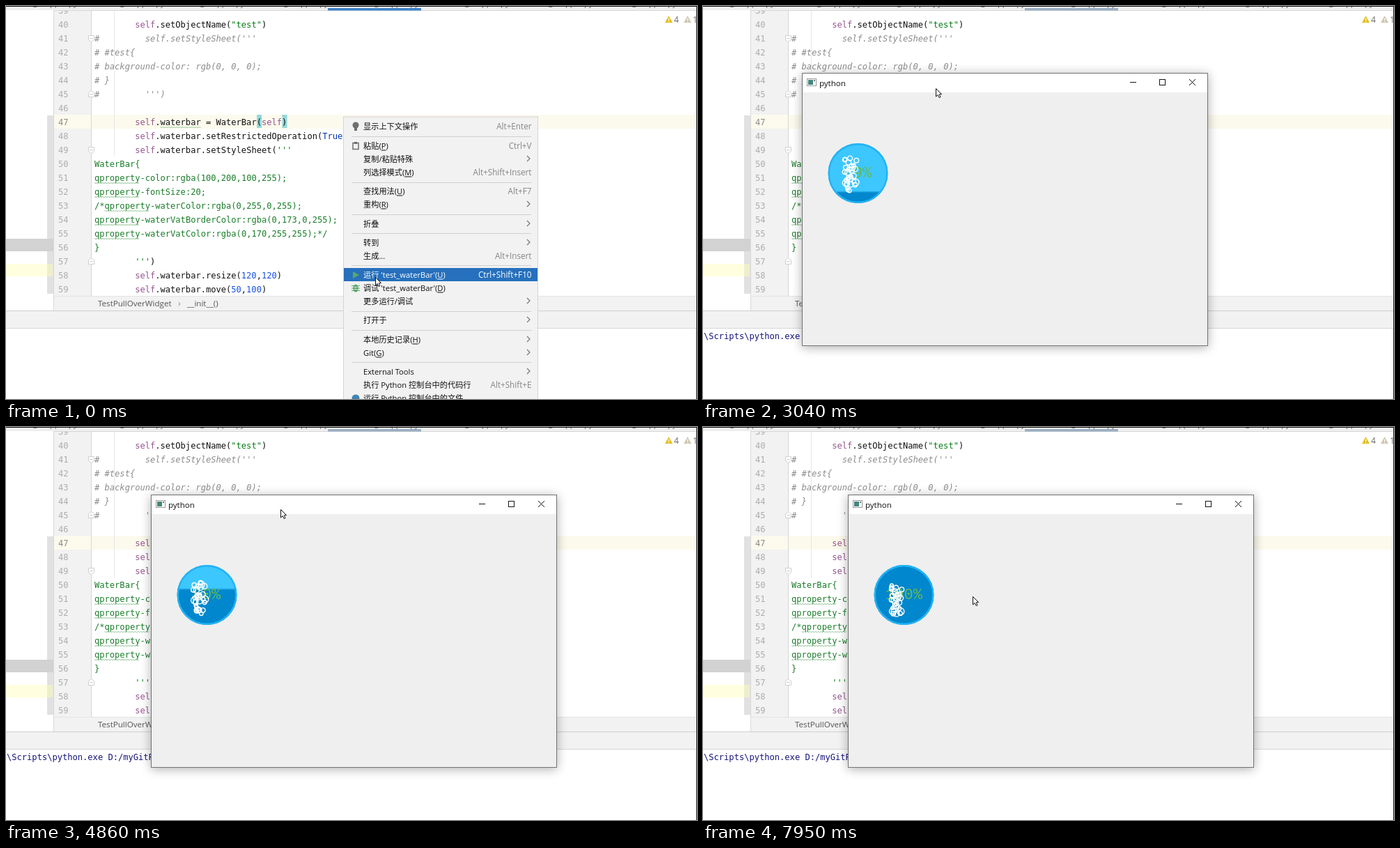
Animation of 992 by 564 pixels, one loop 7990 ms. Source, as an HTML page with a canvas:

```html
<!DOCTYPE html>
<html>
<head>
<meta charset="utf-8">
<style>
  html, body { margin: 0; width: 100%; height: 100%; overflow: hidden; background: #fff; }
  canvas { display: block; }
</style>
</head>
<body>
<canvas id="stage" width="992" height="564"></canvas>
<script>
const ctx = document.getElementById('stage').getContext('2d');
const LOOP = 7990, CHAR = 7.27, CODE_X = 127;
const MONO = '12.08px "DejaVu Sans Mono", monospace';
const ui = size => `${size}px "Open Sans", "Noto Sans CJK SC", "Noto Sans CJK", sans-serif`;

function rect(x, y, w, h, color) {
  ctx.fillStyle = color;
  ctx.fillRect(x, y, w, h);
}
function text(str, x, y, color, font, align = 'left') {
  ctx.font = font;
  ctx.fillStyle = color;
  ctx.textAlign = align;
  ctx.fillText(str, x, y);
}
function path(points, { fill, stroke, width = 1, close = false }) {
  ctx.beginPath();
  points.forEach(([x, y]) => ctx.lineTo(x, y));
  if (close) ctx.closePath();
  if (fill) { ctx.fillStyle = fill; ctx.fill(); }
  if (stroke) { ctx.strokeStyle = stroke; ctx.lineWidth = width; ctx.stroke(); }
}
function circle(x, y, r, { fill, stroke, width = 1 }) {
  ctx.beginPath();
  ctx.arc(x, y, r, 0, Math.PI * 2);
  if (fill) { ctx.fillStyle = fill; ctx.fill(); }
  if (stroke) { ctx.strokeStyle = stroke; ctx.lineWidth = width; ctx.stroke(); }
}
const clamp = v => Math.min(1, Math.max(0, v));
const random = n => { const s = Math.sin(n * 127.1 + 11.7) * 43758.5453; return s - Math.floor(s); };

// Keys are [time, x, y]; eased between neighbours.
function along(keys, t) {
  let i = 0;
  while (i < keys.length - 2 && t > keys[i + 1][0]) i++;
  const [a, b] = [keys[i], keys[i + 1]];
  const p = clamp((t - a[0]) / (b[0] - a[0]));
  const e = p * p * (3 - 2 * p);
  return [a[1] + (b[1] - a[1]) * e, a[2] + (b[2] - a[2]) * e];
}

// ---------- editor ----------
const source = {
  40: '        self.setObjectName("test")',
  41: "#         self.setStyleSheet('''",
  42: '# #test{',
  43: '# background-color: rgb(0, 0, 0);',
  44: '# }',
  45: "#         ''')",
  47: '        self.waterbar = WaterBar(self)',
  48: '        self.waterbar.setRestrictedOperation(True)',
  49: "        self.waterbar.setStyleSheet('''",
  50: 'WaterBar{',
  51: 'qproperty-color:rgba(100,200,100,255);',
  52: 'qproperty-fontSize:20;',
  53: '/*qproperty-waterColor:rgba(0,255,0,255);',
  54: 'qproperty-waterVatBorderColor:rgba(0,173,0,255);',
  55: 'qproperty-waterVatColor:rgba(0,170,255,255);*/',
  56: '}',
  57: "        ''')",
  58: '        self.waterbar.resize(120,120)',
  59: '        self.waterbar.move(50,100)'
};
const lineY = n => 30.6 + (n - 40) * 20;

function tokenColor(token) {
  if (token === 'self') return '#94558d';
  if (token === 'True') return '#0033b3';
  if (/^\d/.test(token)) return '#1750eb';
  return /^["']/.test(token) ? '#067d17' : '#111';
}
function drawLine(n) {
  const line = source[n], y = lineY(n);
  if (line[0] === '#') return text(line, CODE_X, y, '#8c8c8c', 'italic ' + MONO);
  if (n >= 50 && n <= 56) text(line, CODE_X, y, '#1a7d2a', MONO);
  else for (const m of line.matchAll(/self|True|\d+|"test"|'''|[^\s]+?(?=self|True|\d|"|'''|\s|$)/g))
    text(m[0], CODE_X + m.index * CHAR, y, tokenColor(m[0]), MONO);

  const typo = line.match(n === 47 ? /waterbar/ : /qproperty/);
  if (typo) {
    const x = CODE_X + typo.index * CHAR, zigzag = [];
    for (let d = 0; d <= typo[0].length * CHAR; d += 2) zigzag.push([x + d, y + 3 + (d / 2 % 2)]);
    path(zigzag, { stroke: '#8fc394' });
  }
}
function warning(x, color, count) {
  path([[x, 24], [x + 5.5, 14], [x + 11, 24]], { fill: color, close: true });
  rect(x + 5, 17.5, 1.2, 3.5, '#fff');
  rect(x + 5, 22, 1.2, 1.2, '#fff');
  text(count, x + 13, 23.5, '#666', ui(12));
}
function drawEditor(t) {
  rect(0, 0, 992, 564, '#fff');
  rect(69, 6, 53, 410, '#f2f2f2');
  rect(59, 157, 9, 256, '#e1e1e1');
  rect(0, 334, 68, 18, '#d2d2d2');
  rect(0, 370, 67, 18, '#ffffdf');
  rect(59, 370, 8, 18, '#eeeecb');
  rect(69, 156, 922, 20, '#fcfaed');
  rect(68, 6, 1, 431, '#d9d9d9');
  rect(122, 6, 1, 410, '#d6d6d6');
  rect(155, 6, 1, 210, '#e6e6e6');
  for (const column of [32, 37]) rect(CODE_X + column * CHAR + .5, 156, 7, 19, '#93d9d9');

  for (let n = 39; n < 60; n++) {
    text(n, 75, lineY(n), n === 47 ? '#8c8c8c' : '#adadad', MONO);
    if (source[n]) drawLine(n);
  }
  for (const n of [41, 45, 49, 57]) {
    const y = lineY(n) - 4, d = n === 45 || n === 57 ? -1 : 1;
    path([[118.5, y - 4 * d], [126.5, y - 4 * d], [126.5, y + 2 * d], [122.5, y + 5 * d], [118.5, y + 2 * d]],
      { fill: '#fff', stroke: '#cfcfcf', close: true });
    path([[120.5, y], [124.5, y]], { stroke: '#c4c4c4' });
  }
  warning(946, '#e5c01c', '4');
  warning(973, '#cfc8b0', '1');

  rect(0, 0, 992, 6, '#f0f0f0');
  for (const x of [20, 145, 260, 380, 510, 640, 760, 880]) text('test_wrapper.py', x, 0, '#666', ui(11));
  rect(68, 6, 924, 1, '#d6d6d6');
  rect(462, 3, 134, 3.5, t < 850 ? '#4083c9' : '#9cafc4');
  rect(0, 0, 992, 1, '#111');

  rect(69, 416, 923, 21, '#f2f2f2');
  rect(69, 416, 923, 1, '#e4e4e4');
  text('TestPullOverWidget', 132, 431, '#555', ui(11.6));
  text('›', 247, 431, '#888', ui(12));
  text('__init__()', 260, 431, '#555', ui(11.6));
  rect(0, 437, 992, 26, '#f2f2f2');
  rect(0, 437, 992, 1, '#cfcfcf');
  rect(0, 462, 992, 1, '#d6d6d6');
  if (t >= 850)
    text('\\Scripts\\python.exe D:/myGitProject/PyQtGuiLib/PyQtGuiLib/tests/test_waterBar.py', 1, 478, '#14147a', MONO);
  rect(991, 0, 1, 564, '#222');
}

// ---------- context menu: [centre y, label, shortcut or '>'] ----------
const menu = [
  [173, '显示上下文操作', 'Alt+Enter'],
  [201, '粘贴(P)', 'Ctrl+V'], [220, '复制/粘贴特殊', '>'], [239, '列选择模式(M)', 'Alt+Shift+Insert'],
  [266, '查找用法(U)', 'Alt+F7'], [285, '重构(R)', '>'],
  [313, '折叠', '>'],
  [340, '转到', '>'], [359, '生成...', 'Alt+Insert'],
  [386, "运行 'test_waterBar'(U)", 'Ctrl+Shift+F10'], [405, "调试 'test_waterBar'(D)", ''], [424, '更多运行/调试', '>'],
  [451, '打开于', '>'],
  [479, '本地历史记录(H)', '>'], [498, 'Git(G)', '>'],
  [525, 'External Tools', '>'], [544, '执行 Python 控制台中的代码行', 'Alt+Shift+E'], [563, '运行 Python 控制台中的文件', '']
];
function drawMenu() {
  rect(484, 158.5, 280, 420, '#d4d4d4');
  rect(485, 159.5, 278, 410, '#f2f2f2');
  rect(485, 376, 278, 19, '#2670bd');
  for (const y of [187, 253, 299, 326, 372, 438, 465, 511]) rect(496, y, 258, 1, '#d0d0d0');

  for (const [y, label, extra] of menu) {
    const color = y === 386 ? '#fff' : '#111';
    text(label, 513, y + 4, color, ui(11.2));
    const open = label.lastIndexOf('(') + 1;
    if (open) {
      const start = ctx.measureText(label.slice(0, open)).width;
      rect(513 + start, y + 5.5, ctx.measureText(label[open]).width, 1, color);
    }
    if (extra === '>') path([[748, y - 5], [752, y - 1], [748, y + 3]], { stroke: '#777', width: 1.2 });
    else text(extra, 754.5, y + 4, y === 386 ? '#fff' : '#858585', ui(11.7), 'right');
  }

  circle(502, 171, 4.5, { fill: '#6e6e6e' });
  rect(500, 175, 4, 4, '#6e6e6e');
  ctx.strokeStyle = '#6e6e6e';
  ctx.lineWidth = 1.5;
  ctx.strokeRect(498, 196.5, 8, 9);
  rect(500, 195, 4, 3, '#6e6e6e');
  path([[498, 381], [507, 386], [498, 391]], { fill: '#59a869', close: true });
  for (const dy of [-3.5, 0, 3.5]) rect(496, 404.5 + dy, 12, 1, '#59a869');
  ctx.beginPath();
  ctx.ellipse(502, 405, 3.6, 5.5, 0, 0, Math.PI * 2);
  ctx.fillStyle = '#59a869';
  ctx.fill();
  rect(500, 403, 4, 1, '#f2f2f2');
  rect(500, 406, 4, 1, '#f2f2f2');
  circle(502, 563, 5.5, { fill: '#3f86b8' });
}

// ---------- application window ----------
const WIDTH = 583, HEIGHT = 392;
const windowPath = [[0, 100, 95], [2560, 100, 95], [3040, 142, 96], [3120, 148, 96], [3700, 208, 97], [LOOP, 208, 97]];
const cursorPath = [
  [0, 530, 389], [690, 530, 389], [1340, 532, 385], [1420, 530, 382], [1540, 500, 360], [2180, 293, 118],
  [2560, 293, 118], [3040, 334, 118], [3120, 339, 118], [3700, 394, 118], [5250, 394, 118],
  [5550, 393, 175], [6300, 389, 228], [6700, 389, 229], [7400, 387, 243], [LOOP, 387, 243]
];

// The widget's clock stalls while the title bar is first held down.
const runTime = t => t < 2270 ? t - 1610 : Math.max(660, t - 2190);

function drawBubbles(run) {
  const life = 850;
  for (let i = 0; i < 30; i++) {
    const age = (((run / life + random(i)) % 1) + 1) % 1;
    if (run - age * life < -110) continue;
    const x = 70 + (random(i + 40) - .5) * 22 * (.5 + .5 * age);
    const y = 172 - age * (32 + 20 * random(i + 80));
    circle(x, y, 2.4 + 2.6 * random(i + 120), { stroke: '#fff', width: 1.4 });
  }
}
function drawWaterBar(t) {
  const x = 80.5, y = 144, r = 43, run = runTime(t);
  const percent = 100 * clamp(run / 4470);
  ctx.save();
  ctx.beginPath();
  ctx.arc(x, y, r, 0, Math.PI * 2);
  ctx.clip();
  rect(x - r, y - r, 2 * r, 2 * r, '#3dc7ff');
  const top = y + r - percent / 100 * 2 * r;
  const water = ctx.createLinearGradient(0, top - 1.5, 0, top + 1.5);
  water.addColorStop(0, '#3dc7ff');
  water.addColorStop(1, '#0087cd');
  rect(x - r, top - 1.5, 2 * r, 2 * r + 2, water);
  ctx.restore();
  circle(x, y, r - 1.2, { stroke: '#22b3f5', width: 2.4 });
  text(Math.round(percent) + '%', x, y + 5.5, '#64ba58', '22px "Liberation Mono", monospace', 'center');
  drawBubbles(run);
}
// Shadow only outside the frame, so a translucent window is not darkened by it.
function drawShadow() {
  ctx.save();
  ctx.beginPath();
  ctx.rect(-40, -40, WIDTH + 80, HEIGHT + 80);
  ctx.rect(0, 0, WIDTH, HEIGHT);
  ctx.clip('evenodd');
  ctx.shadowColor = 'rgba(0,0,0,.32)';
  ctx.shadowBlur = 14;
  ctx.shadowOffsetY = 2;
  rect(0, 0, WIDTH, HEIGHT, '#fff');
  ctx.restore();
}
function drawWindow(t) {
  if (t < 1200) return;
  const p = clamp((t - 1200) / 190), ease = 1 - (1 - p) ** 2;
  const scale = .95 + .05 * ease;
  const [x, y] = along(windowPath, t).map(Math.round);
  ctx.save();
  ctx.globalAlpha = ease;
  ctx.translate(x + WIDTH / 2, y + HEIGHT / 2);
  ctx.scale(scale, scale);
  ctx.translate(-WIDTH / 2, -HEIGHT / 2);

  drawShadow();
  rect(0, 0, WIDTH, HEIGHT, '#fff');
  if (t >= 1460) {
    rect(0, 28, WIDTH, HEIGHT - 28, '#efefef');
    drawWaterBar(t);
  }
  ctx.strokeStyle = '#737373';
  ctx.lineWidth = 1;
  ctx.strokeRect(.5, .5, WIDTH - 1, HEIGHT - 1);

  ctx.strokeStyle = '#999';
  ctx.strokeRect(7.5, 8.5, 13, 10);
  rect(9, 10, 7, 7, '#45857e');
  rect(17, 10, 2, 2, '#777');
  text('python', 25, 18.5, '#111', ui(11.5));
  path([[471, 13.5], [480, 13.5]], { stroke: '#111' });
  ctx.strokeRect(513.5, 9.5, 8, 8);
  path([[556, 9], [565, 18]], { stroke: '#111' });
  path([[565, 9], [556, 18]], { stroke: '#111' });
  ctx.restore();
}
function drawCursor(t) {
  const [x, y] = along(cursorPath, t);
  const arrow = [[0, 0], [0, 11.5], [2.7, 9], [4.6, 13], [6.5, 12.2], [4.8, 8.3], [8, 8]];
  path(arrow.map(([dx, dy]) => [x + .5 + dx, y + .5 + dy]), { fill: '#fff', stroke: '#111', close: true });
}

function frame(now) {
  const t = now % LOOP;
  drawEditor(t);
  if (t < 690) drawMenu();
  drawWindow(t);
  drawCursor(t);
  requestAnimationFrame(frame);
}
requestAnimationFrame(frame);
</script>
</body>
</html>
```
